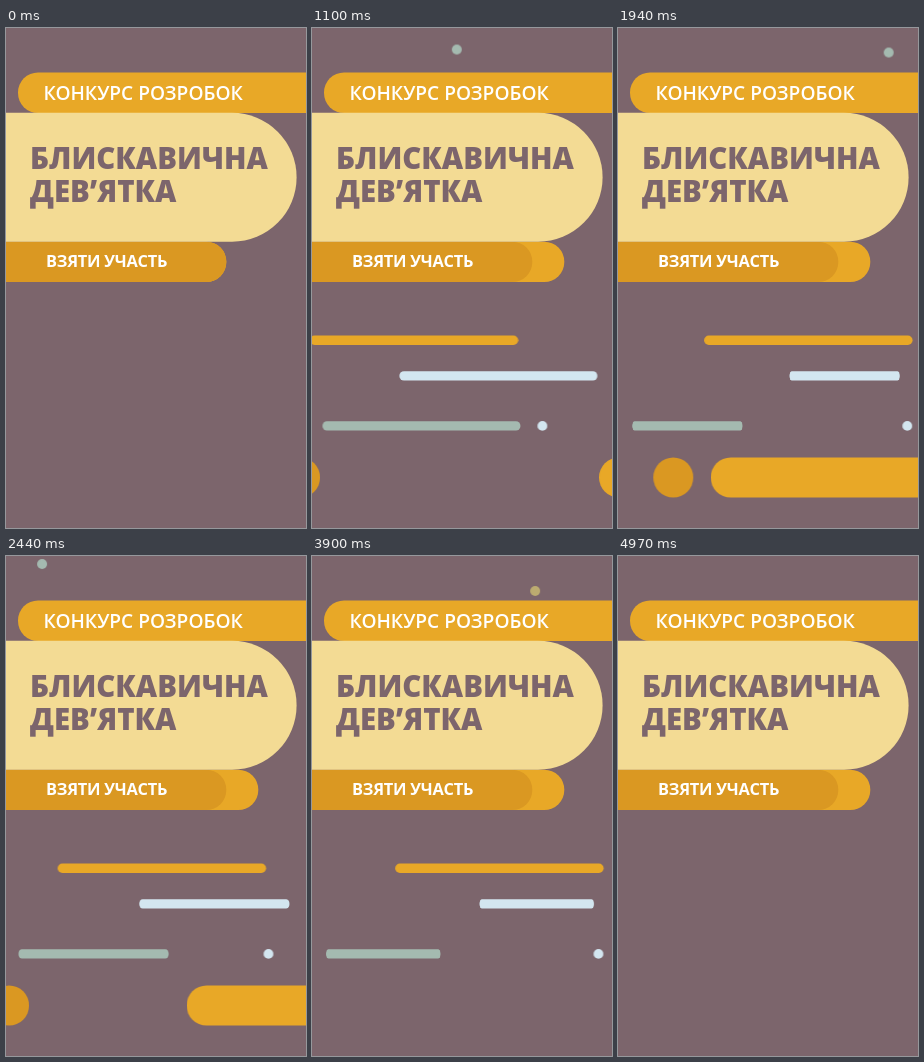
An HTML page for the animation above (5000 ms loop, 300 by 500 pixels).

```html
<!DOCTYPE html>
<html lang="uk">
<head>
<meta charset="utf-8">
<title>Конкурс розробок</title>
<style>
  :root {
    --plum: #7c656c;
    --amber: #e8a827;
    --ochre: #da9822;
    --cream: #f3db94;
    --sage: #a4bab0;
    --sky: #d3e6f0;
  }
  html, body { margin: 0; width: 100%; height: 100%; overflow: hidden; background: var(--plum); }
  svg { display: block; width: 300px; height: 500px; }
  text { font-family: "Open Sans", "Noto Sans", sans-serif; fill: #fff; }
  .title { font-size: 29.4px; font-weight: 800; fill: var(--plum); }
  .label { font-size: 19.15px; font-weight: 600; }
  .cta { font-size: 16.4px; font-weight: 700; letter-spacing: -.25px; }
  .amber { fill: var(--amber); }
  .ochre { fill: var(--ochre); }
  .cream { fill: var(--cream); }
  .sage { fill: var(--sage); }
  .sky { fill: var(--sky); }

  .move { animation: 5s linear infinite; }
  .glow { animation-name: glow; }
  .slider { animation-name: slider; }
  .stretch { animation-name: stretch; }
  .bead { animation-name: bead; }
  .pill { animation-name: pill; }
  .ball { animation-name: ball; }
  .drop { animation-name: drop, tint; }

  @keyframes glow {
    0%, .6% { transform: translateX(-32px); }
    10%, 100% { transform: none; }
  }
  @keyframes slider {
    0% { transform: translateX(335px); }
    20% { transform: translateX(-13px); }
    40%, 80% { transform: translateX(92.3px); }
    60% { transform: none; }
    99.4%, 100% { transform: translateX(301px); }
  }
  @keyframes stretch {
    0%, .6%, 99.4%, 100% { transform: scaleX(0); }
    13.4% { transform: scaleX(.6); }
    20%, 60% { transform: none; }
    40%, 80% { transform: scaleX(.5); }
  }
  @keyframes bead {
    0% { transform: translateX(340px); }
    20%, 60% { transform: translateX(223.3px); }
    40%, 80% { transform: translateX(293.4px); }
    100% { transform: translateX(340px); }
  }
  @keyframes pill {
    0%, 20.9%, 59.2%, 100% { transform: translateX(300px); }
    40% { transform: translateX(79px); }
  }
  @keyframes ball {
    0%, 20%, 52.4%, 100% { transform: translateX(-20px); }
    40% { transform: translateX(60px); }
  }
  /* Two passes along the same wave */
  @keyframes drop {
    0% { transform: translate(22px, -7px); }
    4.5% { transform: translate(36px, 8px); }
    9% { transform: translate(56px, 18px); }
    13.4% { transform: translate(77px, 20px); }
    21.4% { transform: translate(140px, 21px); }
    29.4% { transform: translate(202px, 28px); }
    32.4% { transform: translate(223px, 35px); }
    35% { transform: translate(243px, 36px); }
    39% { transform: translate(272px, 24px); }
    43% { transform: translate(307px, 20px); }
    43.01%, 44% { transform: translate(22px, -7px); }
    48.8% { transform: translate(36px, 8px); }
    54% { transform: translate(60px, 18px); }
    60% { transform: translate(88px, 20px); }
    70% { transform: translate(165px, 22px); }
    75% { transform: translate(200px, 28px); }
    78% { transform: translate(223px, 35px); }
    81% { transform: translate(245px, 35px); }
    85.4% { transform: translate(275px, 24px); }
    89%, 100% { transform: translate(307px, 19px); }
  }
  @keyframes tint {
    0%, 60% { fill: var(--sage); }
    100% { fill: var(--ochre); }
  }
</style>
</head>
<body>
<svg viewBox="0 0 300 500">
  <circle class="move drop sage" r="5"/>

  <rect class="amber" x="12" y="44.5" width="320" height="40.5" rx="20"/>
  <rect class="move glow amber" x="-60" y="213.7" width="312.3" height="40.3" rx="20"/>
  <rect class="ochre" x="-60" y="213.7" width="280.3" height="40.3" rx="20"/>
  <rect class="cream" x="-100" y="84.8" width="390.6" height="128.9" rx="64.45"/>

  <text class="label" x="37.5" y="71.8">КОНКУРС РОЗРОБОК</text>
  <text class="title" x="24" y="141">БЛИСКАВИЧНА</text>
  <text class="title" x="24" y="174">ДЕВ’ЯТКА</text>
  <text class="cta" x="40" y="238.5">ВЗЯТИ УЧАСТЬ</text>

  <rect class="move slider amber" y="307.6" width="208.5" height="9.4" rx="4.7"/>
  <rect class="move stretch sky" x="77.3" y="343.2" width="208.5" height="9.4" rx="4.7" style="transform-origin: 277.3px 0"/>
  <rect class="move stretch sage" x="10" y="393.2" width="208.5" height="9.4" rx="4.7" style="transform-origin: 18.9px 0"/>
  <circle class="move bead sky" cy="397.9" r="4.9"/>

  <rect class="move pill amber" y="429.5" width="400" height="40" rx="20"/>
  <circle class="move ball ochre" cy="449.5" r="20"/>
</svg>
</body>
</html>
```
